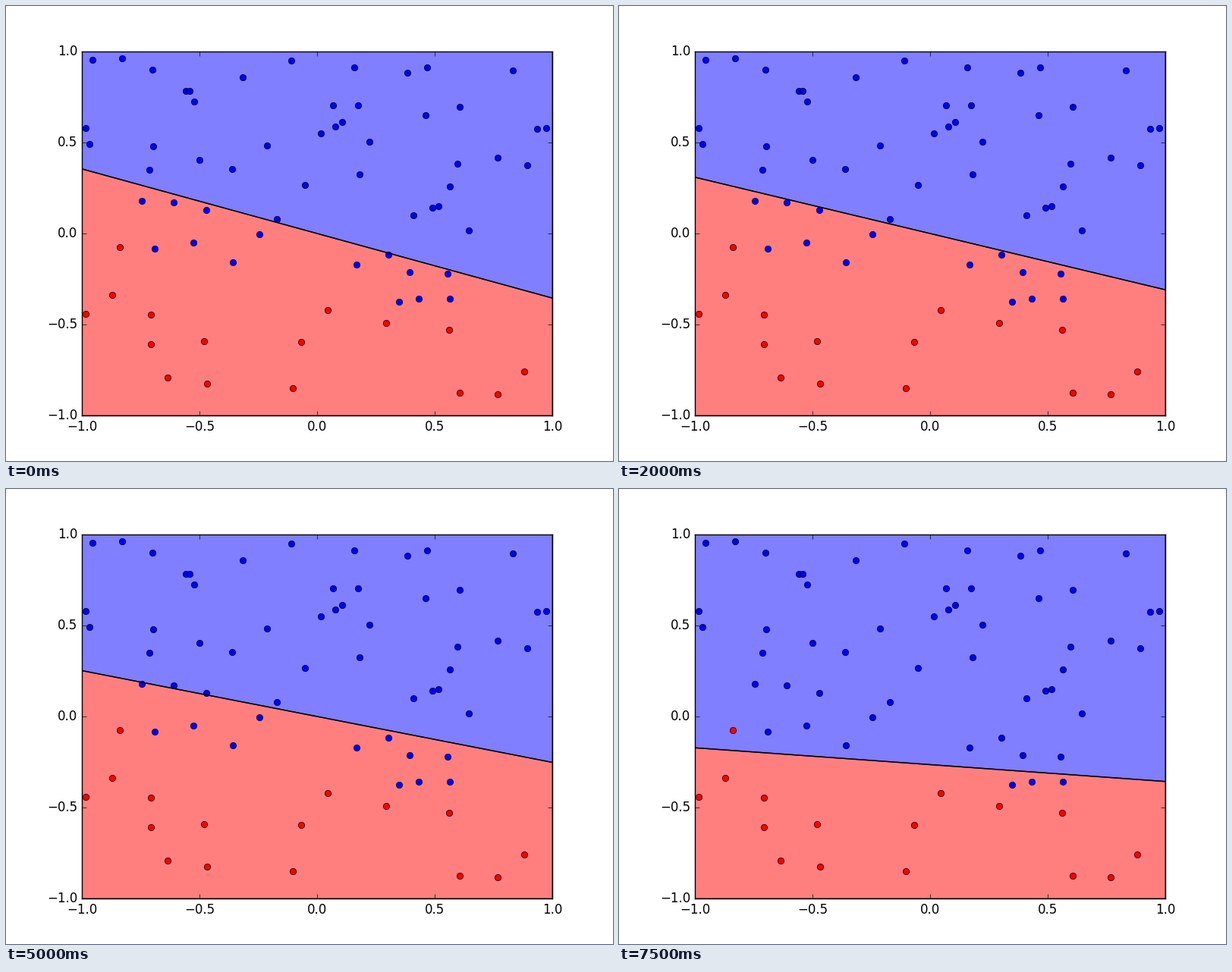
Write a matplotlib script that moves like this. It is 800 px wide and 600 px high and loops after 8000 ms.

```python
import numpy as np
import matplotlib.pyplot as plt
from matplotlib.animation import FuncAnimation
from matplotlib.patches import Polygon

plt.style.use("classic")
plt.rcParams["font.family"] = "DejaVu Sans"

BLUE = np.array([
    (-.245, -.004), (-.171, .079), (-.610, .171), (.555, -.221),
    (.168, -.171), (-.745, .179), (.432, -.358), (-.526, -.050),
    (-.955, .954), (-.829, .963), (-.700, .900), (-.558, .783),
    (-.542, .783), (-.523, .725), (-.316, .858), (-.110, .950),
    (.158, .912), (.384, .883), (.468, .912), (.832, .896),
    (.606, .696), (.461, .650), (.068, .704), (.174, .704),
    (.106, .612), (.077, .588), (.016, .550), (.223, .504),
    (.935, .575), (.974, .579), (.768, .417), (.894, .375),
    (.597, .383), (.565, .258), (.181, .325), (.410, .100),
    (.490, .142), (.516, .150), (.645, .017), (-.984, .579),
    (-.968, .492), (-.697, .479), (-.713, .350), (-.500, .404),
    (-.361, .354), (-.213, .483), (-.052, .267), (-.471, .129),
    (-.690, -.083), (-.358, -.158), (.304, -.117), (.394, -.213),
    (.348, -.375), (.565, -.358),
])
RED = np.array([
    (-.839, -.075), (.294, -.492), (.561, -.529), (-.984, -.442),
    (-.871, -.338), (-.706, -.446), (-.706, -.608), (-.635, -.792),
    (-.481, -.592), (-.468, -.825), (-.103, -.850), (-.068, -.596),
    (.045, -.421), (.606, -.875), (.768, -.883), (.881, -.758),
])

# Perceptron corrections: misclassified point visited at each step
STEPS = [
    (1, 0), (-1, 0), (1, 1), (-1, 1), (1, 2), (-1, 0), (1, 3), (-1, 2),
    (1, 4), (-1, 1), (1, 5), (1, 6), (-1, 3), (-1, 2), (1, 7),
]


def train(w):
    """Return the weights (bias, w_x, w_y) before and after every correction."""
    history = [np.array(w)]
    for label, i in STEPS:
        point = (BLUE if label > 0 else RED)[i]
        history.append(history[-1] + label * np.array([1, *point]))
    return history


WEIGHTS = train((0, .540, 1.522))

fig = plt.figure(figsize=(8, 6), dpi=100, facecolor="white")
ax = fig.add_axes([.125, .1, .775, .8])
ax.set(xlim=(-1, 1), ylim=(-1, 1))
ticks = np.linspace(-1, 1, 5)
ax.set_xticks(ticks)
ax.set_yticks(ticks)


def region(color):
    patch = Polygon(np.zeros((4, 2)), closed=True, facecolor=color,
                    edgecolor="black", alpha=.5, linewidth=1)
    return ax.add_patch(patch)


above, below = region("blue"), region("red")
ax.plot(*BLUE.T, "o", color="blue")
ax.plot(*RED.T, "o", color="red")
border, = ax.plot([], [], color="black")


def update(k):
    b, wx, wy = WEIGHTS[k]
    left, right = (wx - b) / wy, -(wx + b) / wy
    border.set_data([-1, 1], [left, right])
    for patch, edge in ((above, 1), (below, -1)):
        patch.set_xy([(-1, left), (1, right), (1, edge), (-1, edge)])
    return above, below, border


anim = FuncAnimation(fig, update, frames=len(WEIGHTS), interval=500,
                     repeat=True, repeat_delay=0, blit=False)
plt.show()
```
